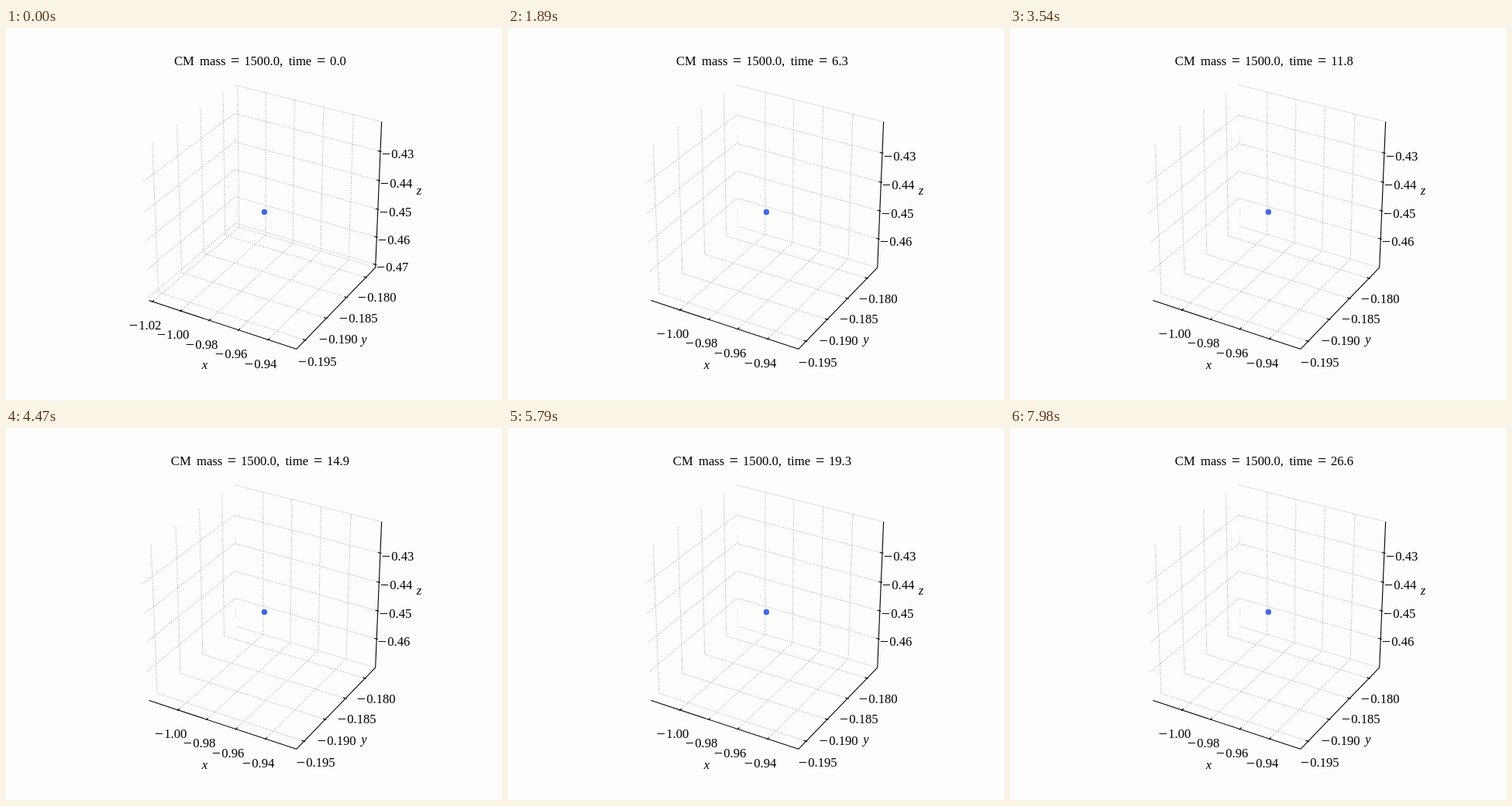
Recreate the animation shown at these times as an HTML page. Size 640 by 480 pixels, loop 8000 ms.

```html
<!DOCTYPE html>
<html>
<head>
<meta charset="utf-8">
<style>
  html, body { margin: 0; width: 100%; height: 100%; overflow: hidden; background: #fdfdfd; }
  svg { display: block; }
  path { fill: none; stroke: #000; stroke-width: 1.11; }
  .grid { stroke: #b0b0b0; stroke-dasharray: 1.11 1.83; }
  .pane { stroke: #dedede; stroke-width: 1; }
  .faint { stroke: #ececec; stroke-width: 1; }
  text { font: 16.67px "Liberation Serif", serif; text-anchor: middle; }
  .math { font-style: italic; }
  .operator { font-size: 20px; }
</style>
</head>
<body>
<svg id="stage" width="640" height="480" viewBox="0 0 640 480"></svg>
<script>
const STEP = 30, LOOP = 8000, EM = 16.67;
const stage = document.getElementById('stage');

function add(parent, tag, attrs = {}, content = '') {
  const node = document.createElementNS('http://www.w3.org/2000/svg', tag);
  for (const key in attrs) node.setAttribute(key, attrs[key]);
  node.textContent = content;
  parent.appendChild(node);
  return node;
}

function addOperator(parent, sign, x, y) {
  add(parent, 'text', { x, y: y + 0.8, class: 'operator' }, sign);
}

// Perspective view of the cube [-1, 1]^3: elevation 30°, azimuth -60°.
// Returns screen x, screen y and the local scale.
function project(point) {
  const [x, y, z] = point.map(v => v * 0.5281);
  const scale = 1997.8 / (10 - (0.433 * x - 0.75 * y + 0.5 * z));
  return [333 + scale * (0.866 * x + 0.5 * y),
          237.4 - scale * (-0.25 * x + 0.433 * y + 0.866 * z), scale];
}

function line(parent, points, cls = '') {
  const d = 'M' + points.map(p => project(p).slice(0, 2).map(v => v.toFixed(2))).join('L');
  add(parent, 'path', { d, class: cls });
}

const E = 25 / 24; // panes reach slightly past the data limits
const TICK_OUT = 1 / 60, TICK_IN = 1 / 30;

const axes = [
  { step: 0.02, digits: 2, margin: 0.05, offset: [-9.8, 30.5],
    grid: p => [[p, E, E], [p, E, -E], [p, -E, -E]],
    tick: p => [[p, -E - TICK_OUT, -E], [p, -E + TICK_IN, -E]] },
  { step: 0.005, digits: 3, margin: 0.05, offset: [14.8, 27],
    grid: p => [[-E, p, E], [-E, p, -E], [E, p, -E]],
    tick: p => [[E + TICK_OUT, p, -E], [E - TICK_IN, p, -E]] },
  { step: 0.01, digits: 2, margin: 0.055, offset: [22.6, 3.8],
    grid: p => [[-E, -E, p], [-E, E, p], [E, E, p]],
    tick: p => [[E + TICK_OUT, E, p], [E - TICK_IN, E, p]] }
];

function negativeLabel(parent, value, digits, cx, cy) {
  const minus = 0.778 * EM, number = (0.778 + 0.5 * digits) * EM;
  const left = Math.round(cx - (minus + number) / 2), y = Math.round(cy + 5.5);
  addOperator(parent, '−', left + minus / 2, y);
  add(parent, 'text', { x: left + minus + number / 2, y }, Math.abs(value).toFixed(digits));
}

// Ticks and grid for limits centred on the particle.
function buildScale(center) {
  const group = add(stage, 'g');
  axes.forEach((axis, i) => {
    const c = center[i], half = axis.margin * Math.abs(c);
    const last = Math.floor((c + half) / axis.step);
    for (let k = Math.ceil((c - half) / axis.step); k <= last; k++) {
      const value = k * axis.step, p = (value - c) / half;
      line(group, axis.grid(p), 'grid');
      line(group, axis.tick(p));
      const [a, b] = axis.tick(p).map(project);
      const [cx, cy] = axis.offset.map((d, j) => (2 * a[j] + b[j]) / 3 + d * a[2] / 200);
      negativeLabel(group, value, axis.digits, cx, cy);
    }
  });
  return group;
}

line(stage, [[-E, E, E], [E, E, E]], 'pane');
line(stage, [[-E, E, -E], [E, E, -E]], 'pane');
add(stage, 'path', { d: 'M296 138V150M296.5 232V245', class: 'faint' });

const startScale = buildScale([-0.972, -0.18725, -0.4456]);
const settledScale = buildScale([-0.9702, -0.187, -0.445]);

line(stage, [[-E, -E, -E], [E, -E, -E]]);
line(stage, [[E, -E, -E], [E, E, -E]]);
line(stage, [[E, E, -E], [E, E, E]]);
add(stage, 'circle', { cx: 333.4, cy: 237.4, r: 3.7, fill: '#4169e1' });
[['x', 256.5, 440], ['y', 462, 407], ['z', 533, 215]].forEach(([name, x, y]) =>
  add(stage, 'text', { x, y, class: 'math' }, name));

// Title words with their centres, in em from the left end.
const title = add(stage, 'g');
[['CM', 0.82], ['mass', 3.03], ['1500.0,', 6.955], ['time', 9.79]]
  .forEach(([word, x]) => add(title, 'text', { x: x * EM, y: 48 }, word));
[4.76, 11.427].forEach(x => addOperator(title, '=', x * EM, 48));
const clock = add(title, 'text', { y: 48 });

function draw(now) {
  const step = Math.floor((now % LOOP) / STEP);
  const time = (step / 10).toFixed(1);
  const clockWidth = (0.5 * time.length - 0.222) * EM;
  clock.textContent = time;
  clock.setAttribute('x', 12.094 * EM + clockWidth / 2);
  title.setAttribute('transform', `translate(${327.7 - (12.094 * EM + clockWidth) / 2} 0)`);
  startScale.style.display = step === 0 ? '' : 'none';
  settledScale.style.display = step === 0 ? 'none' : '';
}

const start = performance.now();
function loop() {
  draw(performance.now() - start);
  requestAnimationFrame(loop);
}
loop();
</script>
</body>
</html>
```
